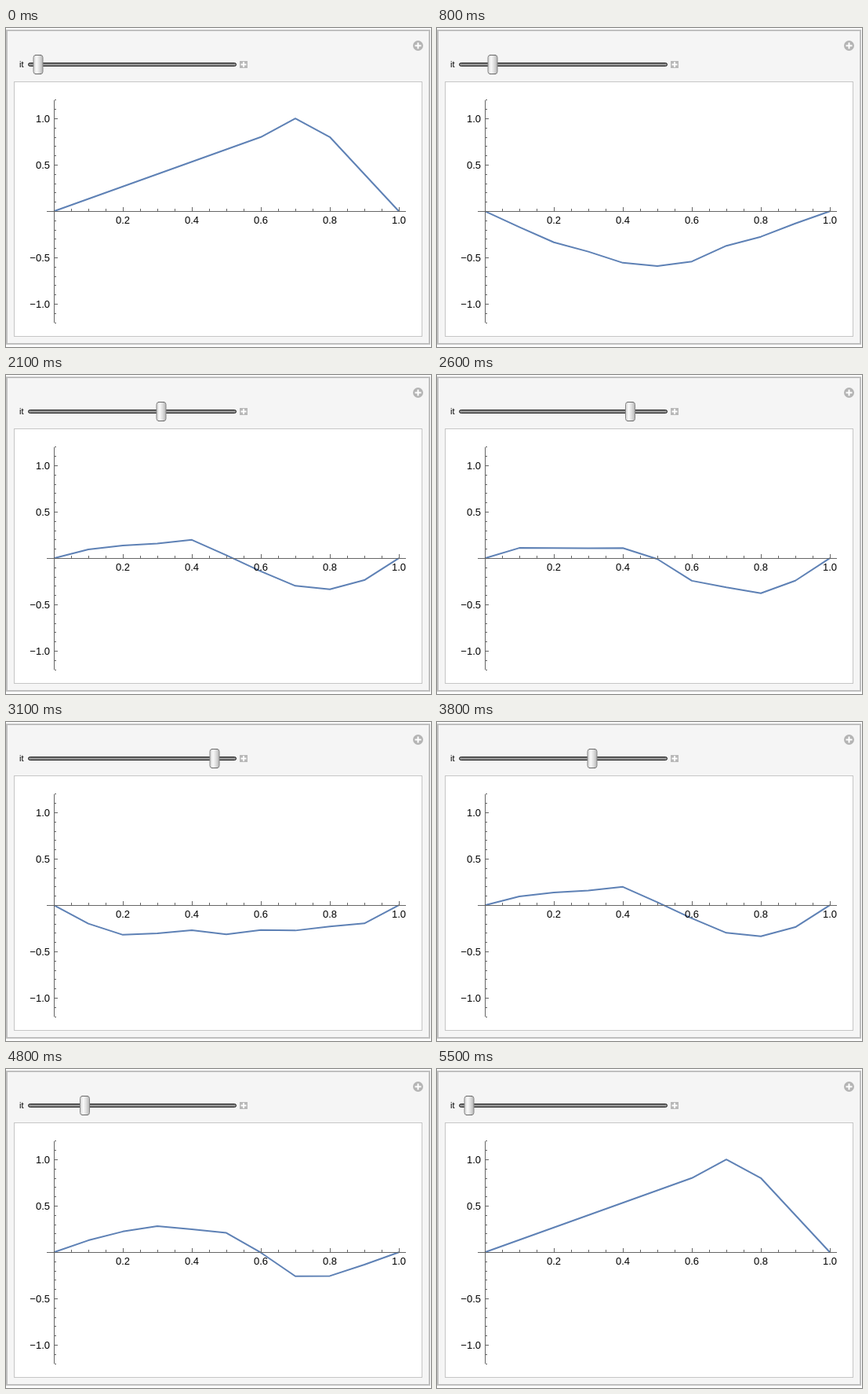
Animation of 542x406 px, one loop 6 s. Source, as an HTML page with a canvas:

```html
<!DOCTYPE html>
<html>
<head>
<meta charset="utf-8">
<style>
html, body { margin: 0; width: 100%; height: 100%; overflow: hidden; background: #fff; }
canvas { display: block; }
</style>
</head>
<body>
<canvas id="stage" width="542" height="406"></canvas>
<script>
const ctx = document.getElementById('stage').getContext('2d');
const CELLS = 10, X0 = 61, Y0 = 233.2, UNIT_X = 440, UNIT_Y = 118;
const FONT = '"Liberation Sans", Arial, sans-serif';
const pluck = [0, 2 / 15, 4 / 15, 0.4, 8 / 15, 2 / 3, 0.8, 1, 0.8, 0.4, 0];

const shape = (mode, i) => Math.sin(mode * Math.PI * i / CELLS);
const stiffness = mode => Math.sin(mode * Math.PI / (2 * CELLS));

// Normal modes of a string of beads with fixed ends
const modes = Array.from({ length: CELLS - 1 }, (_, n) => {
  const mode = n + 1;
  return {
    mode,
    amp: 2 / CELLS * pluck.reduce((sum, u, i) => sum + u * shape(mode, i), 0),
    freq: stiffness(mode) / stiffness(1)
  };
});

const height = (i, phase) => modes.reduce(
  (sum, m) => sum + m.amp * Math.cos(m.freq * phase) * shape(m.mode, i), 0);

function rect(x, y, w, h, color) {
  ctx.fillStyle = color;
  ctx.fillRect(x, y, w, h);
}

function roundBox(x, y, w, h, r, fill, stroke) {
  ctx.beginPath();
  ctx.roundRect(x, y, w, h, r);
  ctx.fillStyle = fill;
  ctx.fill();
  if (!stroke) return;
  ctx.strokeStyle = stroke;
  ctx.lineWidth = 1;
  ctx.stroke();
}

function text(str, x, y, size, align) {
  ctx.font = size + 'px ' + FONT;
  ctx.textAlign = align;
  ctx.fillStyle = '#000';
  ctx.fillText(str, x, y);
}

function plus(x, y, arm, color) {
  rect(x - arm, y - 1, 2 * arm, 2, color);
  rect(x - 1, y - arm, 2, 2 * arm, color);
}

function gradient(x1, y1, x2, y2, ...colors) {
  const g = ctx.createLinearGradient(x1, y1, x2, y2);
  colors.forEach((c, i) => g.addColorStop(i / (colors.length - 1), c));
  return g;
}

function drawPanel() {
  rect(0, 0, 542, 406, '#fff');
  rect(0, 2, 541, 401, '#bfbfbf');
  rect(2, 4, 537, 397, '#f5f5f5');
  rect(10, 68, 521, 325, '#c6c6c6');
  rect(11, 69, 519, 323, '#fff');
  roundBox(519, 16, 13, 13, 6.5, '#b4b4b4');
  plus(525.5, 22.5, 4, '#fff');
  rect(298, 42, 10, 9, '#b8b8b8');
  plus(303, 46.5, 3.5, '#fff');
  text('it', 17, 50, 11, 'left');
}

function drawSlider(x) {
  roundBox(28.5, 44.5, 265, 4, 2, gradient(0, 44, 0, 49, '#555', '#999', '#777'), '#222');
  roundBox(x - 6, 34.5, 12, 24, 3,
    gradient(x - 6, 0, x + 6, 0, '#d2d2d2', '#fafafa', '#dcdcdc', '#b4b4b4'), '#858585');
  rect(x - 4, 34, 8, 1, '#666');
  rect(x - 4, 58, 8, 1, '#666');
}

function drawCurve(phase) {
  ctx.beginPath();
  for (let i = 0; i <= CELLS; i++)
    ctx.lineTo(X0 + UNIT_X * i / CELLS, Y0 - UNIT_Y * height(i, phase));
  ctx.strokeStyle = '#5e81b5';
  ctx.lineWidth = 2;
  ctx.lineJoin = 'round';
  ctx.stroke();
}

function drawAxes() {
  const gray = '#666';
  rect(52, 233, 458, 1, gray);
  rect(61, 92, 1, 283, gray);
  for (let i = 1; i <= 20; i++) {
    const x = X0 + i * UNIT_X / 20, major = i % 4 === 0;
    const len = major ? 5 : 3;
    rect(Math.round(x), 233 - len, 1, len, gray);
    if (major) text((i / 20).toFixed(1), x, 249, 13, 'center');
  }
  for (let i = -12; i <= 12; i++) {
    if (!i) continue;
    const y = Math.round(233 - i * UNIT_Y / 10), major = i % 5 === 0;
    rect(62, y, major ? 4 : 2, 1, gray);
    if (major) text((i / 10).toFixed(1).replace('-', '\u2212'), 56, y + 5, 13, 'right');
  }
}

function frame(now) {
  const tick = Math.floor(now % 6000 / 100);
  const step = Math.max(0, Math.min(tick - 4, 55 - tick, 25));
  const time = Math.max(0, step - 0.919);
  drawPanel();
  drawSlider(Math.round(2 * (41 + 9.75 * time)) / 2);
  drawCurve(time * 72.93 * Math.PI / 180);
  drawAxes();
  requestAnimationFrame(frame);
}
requestAnimationFrame(frame);
</script>
</body>
</html>
```
